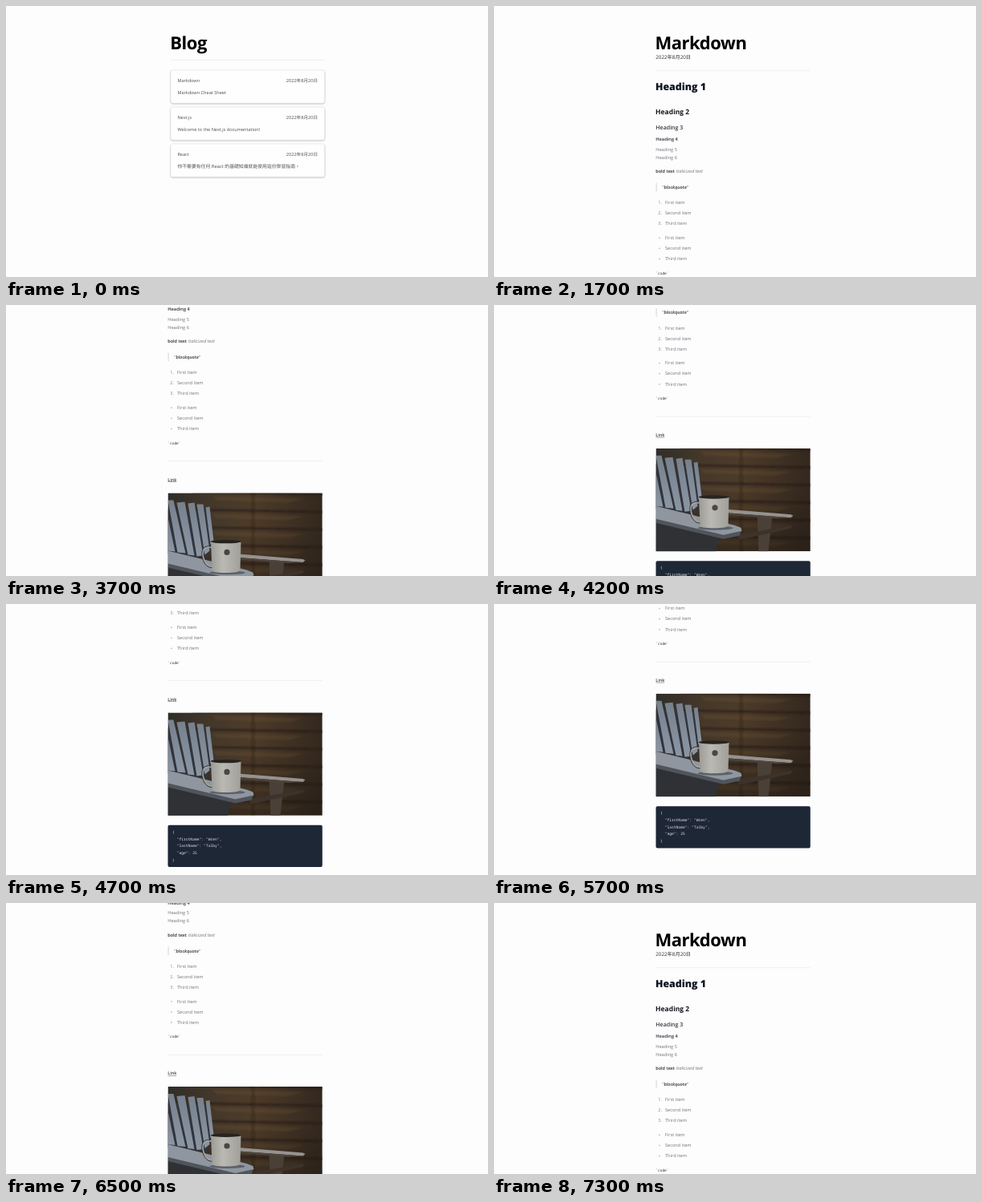
An HTML page that plays this animation: 600x338 px, repeating every 7800 ms.

```html
<!DOCTYPE html>
<html lang="en">
<head>
<meta charset="utf-8">
<title>Blog</title>
<style>
  html, body { margin: 0; width: 100%; height: 100%; overflow: hidden; background: #fdfdfe; }
  svg { display: block; width: 100vw; height: 100vh; }
  text {
    font-family: "Open Sans", "Noto Sans", "Noto Sans CJK TC", "Noto Sans CJK JP", "Noto Sans CJK", sans-serif;
    font-size: 5.65px; fill: #727478; white-space: pre; text-rendering: geometricPrecision;
  }
  .title { font-size: 22px; font-weight: 700; fill: #000; letter-spacing: -.02em; }
  .card { font-size: 5.6px; fill: #4f5052; }
  .han { font-size: 5.85px; }
  .date { font-size: 6.25px; font-weight: 500; fill: #2c2c2e; }
  .h1 { font-size: 12.4px; font-weight: 800; fill: #0f1623; }
  .h2 { font-size: 8.5px; font-weight: 700; fill: #15181d; }
  .h3 { font-size: 7.05px; font-weight: 600; fill: #34373c; }
  .h4 { font-size: 5.7px; font-weight: 600; fill: #303338; }
  .bold { font-size: 5.5px; font-weight: 600; fill: #25272b; }
  .link { font-size: 5.5px; font-weight: 600; fill: #3a3c40; }
  .it { font-size: 5.8px; font-style: italic; }
  .quote { font-style: italic; font-weight: 600; fill: #303338; }
  .quote tspan { fill: #727478; }
  .mark { fill: #85878b; }
  .mono { font-family: "Noto Sans Mono", "DejaVu Sans Mono", monospace; }
  .inline { font-size: 4.5px; font-weight: 500; fill: #2c2e32; }
  .json { font-size: 4.67px; font-weight: 500; fill: #e5e7eb; }
</style>
</head>
<body>
<svg viewBox="0 0 600 338" preserveAspectRatio="none">
  <defs>
    <linearGradient id="wood">
      <stop offset="0" stop-color="#302d29"/>
      <stop offset=".3" stop-color="#45382a"/>
      <stop offset=".55" stop-color="#4d3b29"/>
      <stop offset="1" stop-color="#33281e"/>
    </linearGradient>
    <linearGradient id="shade" x2="0" y2="1">
      <stop offset=".35" stop-color="#18130f" stop-opacity="0"/>
      <stop offset="1" stop-color="#18130f" stop-opacity=".4"/>
    </linearGradient>
    <linearGradient id="slat" x2="0" y2="1">
      <stop offset="0" stop-color="#77818d"/>
      <stop offset="1" stop-color="#8b96a5"/>
    </linearGradient>
    <linearGradient id="enamel">
      <stop offset="0" stop-color="#9c9b96"/>
      <stop offset=".4" stop-color="#bab9b3"/>
      <stop offset="1" stop-color="#a09f99"/>
    </linearGradient>
    <clipPath id="frame"><rect width="192.3" height="128.4"/></clipPath>
    <filter id="soft" x="-5%" y="-20%" width="110%" height="140%"><feGaussianBlur stdDeviation=".8"/></filter>
  </defs>
  <rect width="600" height="338" fill="#fdfdfe"/>
  <g id="list"></g>
  <g id="post"></g>
</svg>
<script>
const LOOP = 7800, OPEN = 1700, STEP = 100;
const list = document.getElementById('list');
const post = document.getElementById('post');

// [time, scroll offset]
const knots = [
  [2800, 0], [2900, 11.4], [3700, 161], [4700, 260], [5200, 295],
  [5600, 295], [5700, 283.6], [6500, 166.4], [7200, 0]
];

const text = (x, y, cls, body, extra = '') =>
  `<text x="${x}" y="${y}" class="${cls}" ${extra}>${body}</text>`;
const rect = (x, y, w, h, fill, extra = '') =>
  `<rect x="${x}" y="${y}" width="${w}" height="${h}" fill="${fill}" ${extra}/>`;
const poly = (points, fill) => `<polygon points="${points}" fill="${fill}"/>`;

function card(y, name, summary, cls = '') {
  return rect(205, y + 1, 191.6, 41, '#000', 'rx="2.4" opacity=".3" filter="url(#soft)"') +
    rect(205, y, 191.6, 41.2, '#fefefe', 'rx="2.4" stroke="#dedee0" stroke-width=".5"') +
    text(213.4, y + 15.2, 'card', name) +
    text(388, y + 15.2, 'card', '2022年8月20日', 'text-anchor="end"') +
    text(213.4, y + 29.7, 'card ' + cls, summary);
}

function wall() {
  let planks = '';
  for (let y = -2; y < 128; y += 22) {
    planks += poly(`30,${y} 200,${y + 3} 200,${y + 5} 30,${y + 1.5}`, '#251d16');
    planks += poly(`55,${y + 6} 170,${y + 9} 150,${y + 14} 60,${y + 11}`, 'rgba(125,95,62,.2)');
  }
  return rect(0, 0, 192.3, 128.4, 'url(#wood)') +
    `<g filter="url(#soft)">${planks}${rect(104, -5, 4, 140, 'rgba(28,20,14,.3)')}</g>` +
    rect(0, 0, 192.3, 128.4, 'url(#shade)');
}

function chair() {
  const slats = [
    '0,30 9,73 0,72', '0,9 7,9 22,75 12,74', '11,12 21,11 33,78 25,77',
    '25,13 33,12 44,78 36,79', '36,14 44,14 52,72 46,77', '47,18 52,17 57,60 53,64'
  ];
  return poly('0,20 47,22 56,64 48,82 0,76', '#32343a') +
    slats.map(points => poly(points, 'url(#slat)')).join('') +
    poly('0,92 80,108 74,129 0,129', '#2f3134') +
    poly('126,84 145,84 140,129 128,129', '#4a4037') +
    poly('100,108 170,96 168,100 104,114', '#3d332a') +
    poly('88,76 168,82.5 171,84 168,86.5 88,80.5', '#96928f') +
    poly('88,80.5 168,86.5 150,87.5 88,83', '#4d443c') +
    poly('0,87 84,107 107,102 104,109 84,113 0,93', '#50555c') +
    poly('0,72 45,83 98,96 106,99 107,103 84,108 0,88', '#8f969f');
}

function mug() {
  return '<ellipse cx="74" cy="99.5" rx="22" ry="2.4" fill="#5b6169"/>' +
    '<path d="M55 68C44 65 42 73 44 81S51 93 56 92" fill="none" stroke="#a5a49e" stroke-width="2.2"/>' +
    '<path d="M55 67C43 64 41 73 43 81S50 94 56 93" fill="none" stroke="#26241f" stroke-width=".9"/>' +
    '<path d="M53.5 61H91L90 96Q89 99.5 72 99.5T55 96Z" fill="url(#enamel)"/>' +
    '<ellipse cx="72.2" cy="60.7" rx="19" ry="2.2" fill="#27231f"/>' +
    '<circle cx="73.5" cy="74" r="3.6" fill="#4b4740"/>';
}

const photo = () =>
  `<g transform="translate(201.5 395.4)" clip-path="url(#frame)">${wall()}${chair()}${mug()}</g>`;

function buildList() {
  return text(204.2, 54, 'title', 'Blog') +
    rect(205, 67.3, 192, .6, '#e6e6e9') +
    card(80, 'Markdown', 'Markdown Cheat Sheet') +
    card(126, 'Next.js', 'Welcome to the Next.js documentation!') +
    card(172, 'React', '你不需要有任何 React 的基礎知識就能使用這份學習指南。', 'han');
}

function buildPost() {
  const x = 201.3;
  const items = ['First item', 'Second item', 'Third item'];
  const json = ['{', '  "firstName": "Wren",', '  "lastName": "Talby",', '  "age": 25', '}'];
  let s = text(200.4, 54.3, 'title', 'Markdown') +
    text(x, 66.3, 'date', '2022年8月20日') +
    rect(x, 80.5, 192.4, .6, '#e5e7eb') +
    text(x - .4, 105.4, 'h1', 'Heading 1') +
    text(x - .2, 134.6, 'h2', 'Heading 2') +
    text(x, 154.4, 'h3', 'Heading 3') +
    text(x, 168.1, 'h4', 'Heading 4') +
    text(x, 180.6, '', 'Heading 5') +
    text(x, 190.8, '', 'Heading 6') +
    text(x, 208.2, 'bold', 'bold text') +
    text(226.8, 208.2, 'it', 'italicized text') +
    rect(201.5, 220.6, 1.3, 10.6, '#dcdee2') +
    text(209, 228, 'quote', '<tspan>"</tspan>blockquote<tspan>"</tspan>');
  items.forEach((item, i) => {
    const y = 247.2 + i * 13.1;
    s += text(209, y, 'mark', `${i + 1}.`, 'text-anchor="end"') + text(213, y, '', item);
    s += `<circle cx="206" cy="${y + 42}" r=".9" fill="#b9bcc2"/>` + text(213, y + 43.8, '', item);
  });
  s += text(x, 334.8, 'mono inline', '`code`') +
    rect(x, 355.4, 192.4, .6, '#e5e7eb') +
    text(x, 380.8, 'link', 'Link') +
    rect(201.5, 381.4, 10.6, .5, '#4b4e53') +
    photo() +
    rect(201.5, 535.8, 192.3, 52.2, '#1e2736', 'rx="2"');
  json.forEach((line, i) => {
    s += text(207, 546 + i * 8.7, 'mono json', line);
  });
  return s;
}

// Smooth curve through the knots, flat wherever the page rests.
function slope(i) {
  const a = knots[i - 1], b = knots[i], c = knots[i + 1];
  if (!a || !c || a[1] === b[1] || b[1] === c[1]) return 0;
  return (c[1] - a[1]) / (c[0] - a[0]);
}

function scrollAt(t) {
  const i = knots.findIndex(k => t < k[0]);
  if (i < 1) return 0;
  const [t0, p0] = knots[i - 1], [t1, p1] = knots[i];
  const d = t1 - t0, u = (t - t0) / d, v = 1 - u;
  return v * v * ((1 + 2 * u) * p0 + u * d * slope(i - 1)) +
    u * u * ((1 + 2 * v) * p1 - v * d * slope(i));
}

function draw(ms) {
  const t = Math.floor((ms % LOOP) / STEP) * STEP;
  const open = t >= OPEN;
  list.style.display = open ? 'none' : '';
  post.style.display = open ? '' : 'none';
  post.setAttribute('transform', `translate(0 ${-scrollAt(t).toFixed(2)})`);
}

list.innerHTML = buildList();
post.innerHTML = buildPost();
const start = performance.now();
function tick() {
  draw(performance.now() - start);
  requestAnimationFrame(tick);
}
tick();
</script>
</body>
</html>
```
